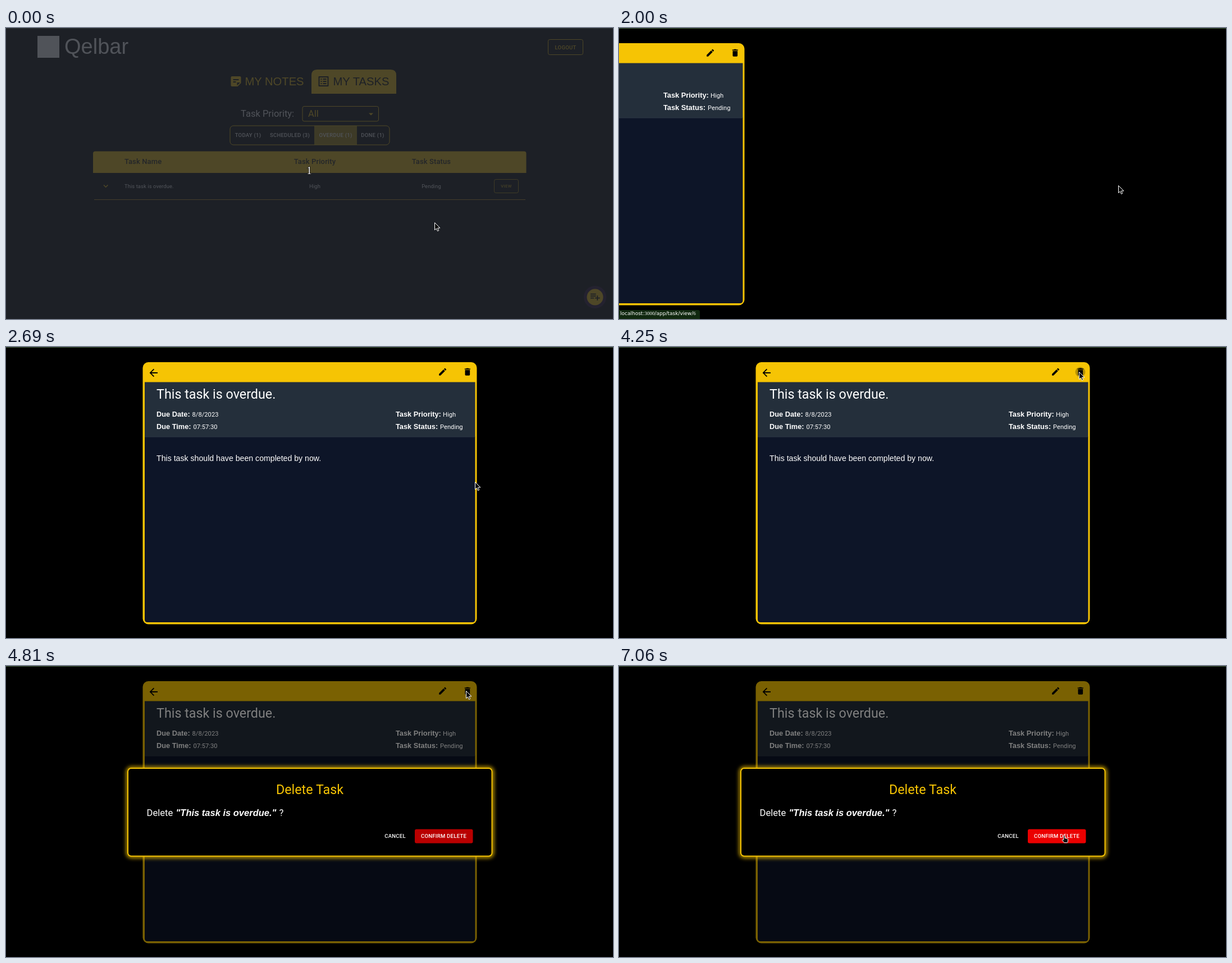
Animation of 1081 by 518 pixels, one loop 8000 ms. Source, as an HTML page:

```html
<!DOCTYPE html>
<html lang="en">
<head>
<meta charset="utf-8">
<title>Task manager</title>
<style>
  html, body { margin: 0; width: 100%; height: 100%; overflow: hidden; background: #000; }
  svg { display: block; width: 1081px; height: 518px; }
  text { font-family: Roboto, "Open Sans", sans-serif; fill: #fff; white-space: pre; }
  .sans { font-family: "Liberation Sans", Arial, sans-serif; }
  .gold { fill: #f6c404; }
  .dark { fill: #000; }
  .line { fill: none; stroke: #f6c404; }
  .mid { text-anchor: middle; }
  .tab { font-size: 20.2px; }
  .btn { font-size: 9.5px; font-weight: 500; letter-spacing: .27px; }
  .head { font-size: 13px; font-weight: 500; letter-spacing: .12px; fill: #1c1a10; }
  .cell { font-size: 9.4px; letter-spacing: .1px; }
  .big { font-size: 23.3px; }
  .label { font-size: 12.8px; font-weight: 700; }
  .value { font-size: 11.2px; }
</style>
</head>
<body>
<svg viewBox="0 0 1081 518">
  <defs>
    <filter id="glow" x="-5%" y="-15%" width="110%" height="130%"><feGaussianBlur stdDeviation="3.5"/></filter>
  </defs>
  <rect width="1081" height="518"/>

  <g id="list">
    <rect x="56" y="14" width="39" height="39" fill="#fff"/>
    <text class="sans" x="104" y="46" font-size="38">Qelbar</text>
    <rect class="line" x="965.5" y="20.5" width="62" height="27" rx="3"/>
    <text class="btn gold mid" x="996.5" y="37.5">LOGOUT</text>

    <path class="gold" transform="translate(397.5 83)" d="M19 3H5C3.9 3 3 3.9 3 5v14c0 1.100.9 2 2 2h10l6-6V5c0-1.100-.9-2-2-2zM7 8h10v2H7V8zm5 6H7v-2h5v2zm2 5.500V14h5.500L14 19.500z"/>
    <text class="sans tab gold" x="425.500" y="101.500">MY NOTES</text>
    <path class="gold" d="M544 117V84q0-10 10-10H685q10 0 10 10V117z"/>
    <path transform="translate(553.5 83)" d="M19 5v14H5V5h14m1.100-2H3.900c-.5 0-.9.4-.9.9v16.200c0 .4.4.9.9.9h16.200c.4 0 .9-.5.9-.9V3.900c0-.5-.5-.9-.9-.9zM11 7h6v2h-6zm0 4h6v2h-6zm0 4h6v2h-6zM7 7h2v2H7zm0 4h2v2H7zm0 4h2v2H7z"/>
    <text class="sans tab dark" x="582.500" y="101.500">MY TASKS</text>

    <text x="418" y="158" font-size="16.500">Task Priority:</text>
    <rect class="line" x="528" y="139.500" width="135.500" height="26.500" rx="3"/>
    <text class="gold" x="538" y="158" font-size="16.500">All</text>
    <path class="gold" d="M646 151.500h8l-4 4z"/>

    <rect x="549" y="174" width="76" height="34" fill="#a28204"/>
    <rect class="line" x="399" y="174" width="284" height="34" rx="6"/>
    <text class="btn mid" x="431" y="193.500">TODAY (1)</text>
    <text class="btn mid" x="505.500" y="193.500">SCHEDULED (3)</text>
    <text class="btn mid" x="587" y="193.500">OVERDUE (1)</text>
    <text class="btn mid" x="653" y="193.500">DONE (1)</text>

    <path class="gold" d="M155 258V223.500q0-4 4-4H922.500q4 0 4 4V258z"/>
    <text class="head" x="211" y="242">Task Name</text>
    <text class="head mid" x="550" y="242">Task Priority</text>
    <text class="head mid" x="757.500" y="242">Task Status</text>
    <path class="line" d="M174 279.500l3.700 3.700 3.700-3.700" stroke-width="1.500"/>
    <text class="cell" x="211" y="284.500">This task is overdue.</text>
    <text class="cell mid" x="550" y="284.500">High</text>
    <text class="cell mid" x="757.500" y="284.500">Pending</text>
    <rect id="viewHover" x="869.500" y="269.500" width="43" height="24" rx="3" fill="#211a03"/>
    <rect class="line" x="869.500" y="269.500" width="43" height="24" rx="3" stroke-opacity=".7"/>
    <text class="gold mid" x="891" y="284" font-size="7.500" font-weight="500" letter-spacing=".4" opacity=".8">VIEW</text>
    <path d="M157 305.500H925" stroke="#c8961c"/>

    <circle cx="1049" cy="479" r="20" fill="#240a30"/>
    <circle class="gold" cx="1049" cy="479" r="14.500"/>
    <path transform="translate(1038.300 467.500) scale(.88)" d="M14 10H3v2h11zm0-4H3v2h11zm4 8v-4h-2v4h-4v2h4v4h2v-4h4v-2h-4zM3 16h7v-2H3z"/>
  </g>

  <g id="detail">
    <rect class="gold" x="243.500" y="27" width="595" height="466.500" rx="10"/>
    <path d="M247 62.500H835.500V160H247z" fill="#242f3b"/>
    <path d="M247 160H835.500V485q0 5-5 5H252q-5 0-5-5z" fill="#0d1528"/>
    <path d="M247 160H835.500" stroke="#2c3743"/>
    <path transform="translate(252 35.200) scale(.9)" d="M20 11H7.830l5.590-5.590L12 4l-8 8 8 8 1.410-1.410L7.830 13H20z"/>
    <path transform="translate(769 35.600) scale(.72)" d="M3 17.250V21h3.750L17.810 9.940l-3.750-3.750zM20.710 7.040c.39-.39.39-1.020 0-1.410l-2.340-2.340c-.39-.39-1.020-.39-1.410 0l-1.830 1.830 3.750 3.750z"/>
    <circle id="binHover" cx="821.500" cy="44.500" r="9"/>
    <path transform="translate(813.200 35.600) scale(.72)" d="M6 19c0 1.100.9 2 2 2h8c1.100 0 2-.9 2-2V7H6zM19 4h-3.500l-1-1h-5l-1 1H5v2h14z"/>
    <text class="big" x="268" y="92">This task is overdue.</text>
    <text class="sans label" x="268" y="124">Due Date:</text>
    <text class="value" x="331.500" y="124">8/8/2023</text>
    <text class="sans label" x="268" y="146">Due Time:</text>
    <text class="value" x="333.500" y="146">07:57:30</text>
    <text class="sans label" x="694" y="124">Task Priority:</text>
    <text class="value" x="778" y="124">High</text>
    <text class="sans label" x="694" y="146">Task Status:</text>
    <text class="value" x="773" y="146">Pending</text>
    <text class="sans" x="268" y="203" font-size="14.150">This task should have been completed by now.</text>
  </g>

  <g id="modal">
    <rect width="1081" height="518" opacity=".5"/>
    <rect class="line" x="217" y="182" width="649" height="157" rx="6" stroke-width="5" filter="url(#glow)"/>
    <rect x="217" y="182" width="648.500" height="156.500" rx="6" stroke="#f6c404" stroke-width="2"/>
    <text class="big gold mid" x="541" y="227.500">Delete Task</text>
    <text x="250.500" y="267" font-size="16.600">Delete</text>
    <text class="sans" x="302.500" y="267" font-size="16.500" font-weight="700" font-style="italic">"This task is overdue."</text>
    <text x="486.500" y="267" font-size="16.600">?</text>
    <text class="btn mid" x="693" y="306">CANCEL</text>
    <rect id="confirm" x="728" y="290.500" width="103.500" height="25" rx="3"/>
    <text class="btn mid" x="779.500" y="306">CONFIRM DELETE</text>
  </g>

  <g id="status">
    <path d="M0 502H141q3 0 3 3V518H0z" fill="#10280f"/>
    <text x="2" y="511" font-size="9" style="font-family:'DejaVu Sans',sans-serif">localhost:<tspan font-family="Liberation Serif, serif">3000</tspan>/app/task/view/<tspan font-family="Liberation Serif, serif">6</tspan></text>
  </g>
  <rect width="1081" height="1" fill="#45603f"/>

  <g id="countdown">
    <rect width="1081" height="518" fill="#252830" opacity=".8"/>
    <text class="mid" x="540" y="260" font-size="18" style="font-family:'Liberation Serif',serif" stroke="#111" stroke-width="1.500" paint-order="stroke">1</text>
  </g>

  <g id="cursor" fill="#0a0a0a" stroke="#fff" stroke-linejoin="round">
    <path id="arrow" d="M.5.5V13.500l3-2.600 2 4.600 2.200-1-2-4.500h4.300z"/>
    <path id="hand" d="M-1.200 8V1.700a1.200 1.200 0 0 1 2.400 0V5.500l4 .8q1.500.3 1.400 1.800l-.5 4.400q-.2 1-1.200 1H-.2l-3.400-4.200q-.6-1 .4-1.400.9-.2 2 1z"/>
  </g>
</svg>
<script>
const LOOP = 8000, TICK = 62.5;
const el = id => document.getElementById(id);
const clamp = v => Math.min(1, Math.max(0, v));
const ramp = (k, from, to) => clamp((k - from) / (to - from));
const show = (id, on) => el(id).setAttribute("opacity", +on);
const move = (id, x, y) => el(id).setAttribute("transform", `translate(${x} ${y})`);
const easeInOut = p => p < .5 ? .5 * (2 * p) ** 1.8 : 1 - .5 * (2 - 2 * p) ** 1.8;

// Pointer stops: tick, x, y
const stops = [
  [0, 763, 346], [9, 763, 346], [15, 877, 280], [20, 889, 280], [42, 889, 280],
  [43, 835, 240], [44, 830, 184], [47, 830, 184], [53, 828, 90], [59, 823, 47],
  [60, 823, 47], [61, 819, 44], [88, 819, 44], [90, 806, 100], [92, 826, 205],
  [94, 832, 231], [98, 832, 231], [99, 825, 263], [101, 825, 263],
  [107, 806, 293], [113, 793, 301], [128, 793, 301]
];

function pointer(k) {
  const i = stops.findIndex(s => s[0] > k);
  const [k0, x0, y0] = stops[i - 1], [k1, x1, y1] = stops[i];
  const p = (k - k0) / (k1 - k0);
  return [x0 + (x1 - x0) * p, y0 + (y1 - y0) * p];
}

function draw(ms) {
  const k = Math.min(127, Math.floor((ms + 5) / TICK));
  const slide = easeInOut(clamp((k * TICK - 1680) / 695));
  const [x, y] = pointer(k);
  const overView = k >= 15 && k < 27, overConfirm = k >= 107;

  show("countdown", k < 1);
  show("list", k < 27);
  show("viewHover", overView);
  show("detail", k >= 27);
  move("detail", -1081 * (1 - slide), 0);
  show("binHover", .25 * ramp(k, 56, 59) * (1 - ramp(k, 70, 75)));
  show("modal", easeInOut(ramp(k, 69, 77)));
  show("status", k < 36 ? ramp(k, 16, 22) : 0);

  const red = 185 + 50 * ramp(k, 106, 110);
  el("confirm").setAttribute("fill", `rgb(${red} 0 0)`);
  move("cursor", x, y);
  show("hand", overView || overConfirm);
  show("arrow", !overView && !overConfirm);
}

const start = performance.now();
function loop() {
  draw((performance.now() - start) % LOOP);
  requestAnimationFrame(loop);
}
loop();
</script>
</body>
</html>
```
